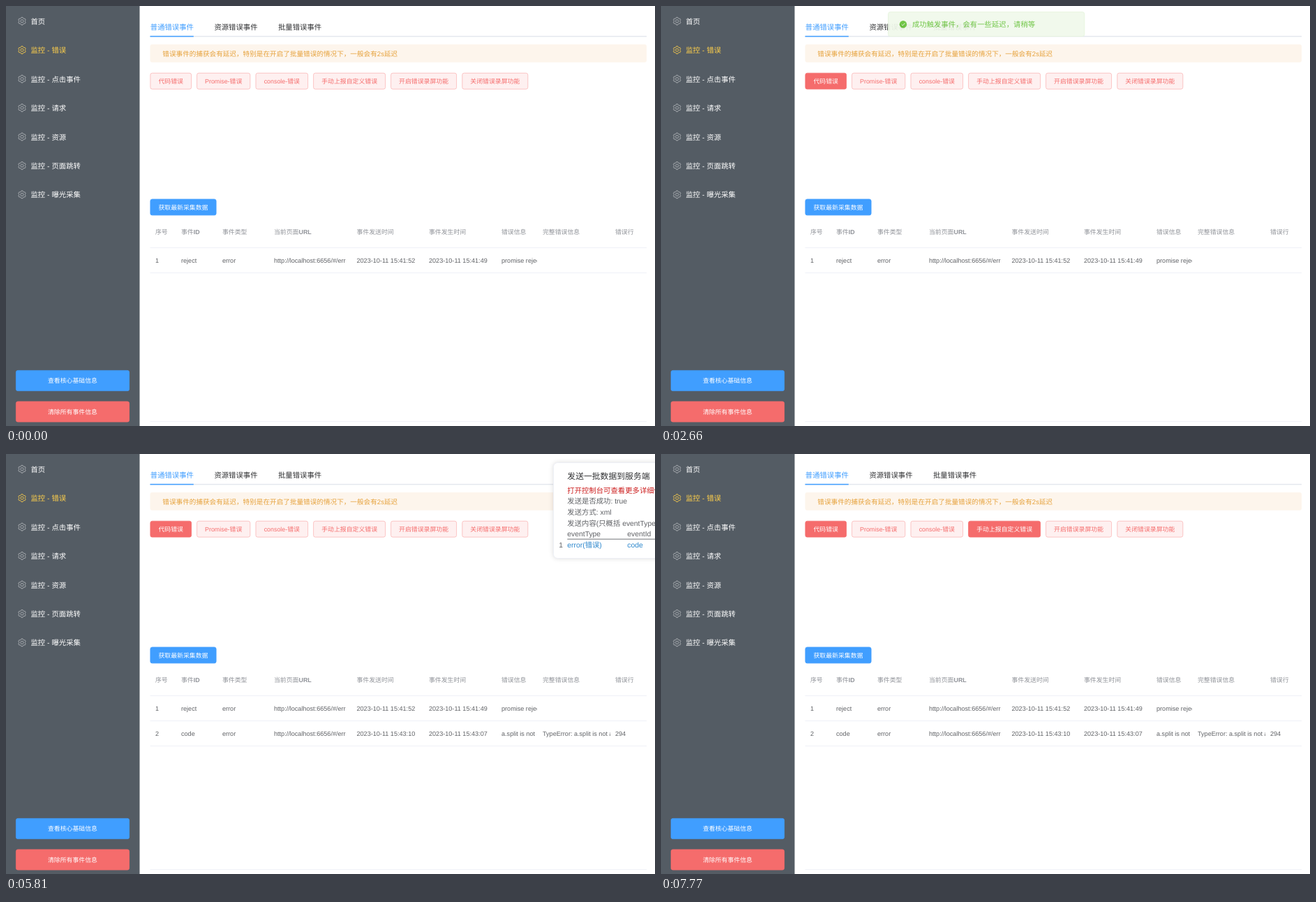
An HTML page that plays this animation: 930x602 px, repeating every 8 s.

```html
<!DOCTYPE html>
<html lang="zh-CN">
<head>
<meta charset="utf-8">
<title>监控 - 错误</title>
<style>
html, body { margin: 0; width: 100%; height: 100%; overflow: hidden; background: #fff; }
svg { display: block; }
text { font-family: "Liberation Sans", "Noto Sans CJK SC", "Noto Sans CJK", sans-serif; text-rendering: geometricPrecision; white-space: pre; }
.medium { font-weight: 500; }

.slide-msg, .fade-msg, .slide-note, .fade-note, .new-row,
.press-code rect, .press-code text, .press-custom rect, .press-custom text {
  animation: 8s ease infinite paused;
}
.slide-msg { animation-name: slide-msg; }
.fade-msg { animation-name: fade-msg; }
.slide-note { animation-name: slide-note; }
.fade-note { animation-name: fade-note; }
.new-row { animation-name: new-row; animation-timing-function: step-end; }
.press-code rect { animation-name: code-box; }
.press-code text { animation-name: code-label; }
.press-custom rect { animation-name: custom-box; }
.press-custom text { animation-name: custom-label; }
.note-card { filter: drop-shadow(0 0 3px rgba(0, 0, 0, .14)); }

@keyframes slide-msg {
  0%, 30.69% { transform: translateY(-35.5px); }
  35.69%, 68.69% { transform: none; }
  73.69%, 100% { transform: translateY(-35.5px); }
}
@keyframes fade-msg {
  0%, 30.69% { opacity: 0; }
  34.44%, 68.69% { opacity: 1; }
  72.44%, 100% { opacity: 0; }
}
@keyframes slide-note {
  0%, 71.375% { transform: translateX(253px); }
  75.125%, 100% { transform: none; }
}
@keyframes fade-note {
  0%, 71.37% { opacity: 0; }
  71.38%, 90.375% { opacity: 1; }
  94.125%, 100% { opacity: 0; }
}
@keyframes new-row { 0% { opacity: 0; } 71.4%, 100% { opacity: 1; } }
@keyframes code-box {
  0%, .625% { fill: #fef0f0; stroke: #fab6b6; }
  2.125%, 100% { fill: #f56c6c; stroke: #f56c6c; }
}
@keyframes code-label { 0%, .625% { fill: #f56c6c; } 2.125%, 100% { fill: #fff; } }
@keyframes custom-box {
  0%, 95.75% { fill: #fef0f0; stroke: #fab6b6; }
  97%, 100% { fill: #f56c6c; stroke: #f56c6c; }
}
@keyframes custom-label { 0%, 95.75% { fill: #f56c6c; } 97%, 100% { fill: #fff; } }
</style>
</head>
<body>
<svg id="stage" width="930" height="602" viewBox="0 0 930 602"></svg>
<script>
const BODY = 10.36, SMALL = 8.9, CELL = 9.1;
const BLUE = '#409eff', RED = '#f56c6c', GREY = '#606266', DARK = '#303133', RULE = '#ebeef5';

// Text is placed by its left edge (or middle) and its vertical centre.
const text = (x, cy, str, fill, size = BODY, attrs = '') =>
  `<text x="${x}" y="${cy + size * 0.37}" font-size="${size}" fill="${fill}" ${attrs}>${str}</text>`;
const rect = (x1, y1, x2, y2, fill, attrs = '') =>
  `<rect x="${x1}" y="${y1}" width="${x2 - x1}" height="${y2 - y1}" fill="${fill}" ${attrs}/>`;
const button = (x1, y1, x2, y2, label, fill, border, color, cls = '') =>
  `<g class="${cls}">` +
  rect(x1 + .4, y1 + .4, x2 - .4, y2 - .4, fill, `rx="2.6" stroke="${border}" stroke-width=".8"`) +
  text((x1 + x2) / 2, (y1 + y2) / 2, label, color, SMALL, 'text-anchor="middle" class="medium"') + '</g>';
const solid = (x1, y1, x2, y2, label, fill) => button(x1, y1, x2, y2, label, fill, fill, '#fff');
const rule = y => rect(206.5, y - .4, 918, y + .4, RULE);

function gear(cx, cy, color) {
  const points = [];
  for (let tooth = 0; tooth < 6; tooth++) {
    for (const [offset, radius] of [[-26, 4.25], [-11, 5.5], [11, 5.5], [26, 4.25]]) {
      const angle = (tooth * 60 - 90 + offset) * Math.PI / 180;
      points.push((cx + radius * Math.cos(angle)).toFixed(2) + ',' + (cy + radius * Math.sin(angle)).toFixed(2));
    }
  }
  return `<g fill="none" stroke="${color}" stroke-width=".83" stroke-linejoin="round">` +
    `<polygon points="${points.join(' ')}"/><circle cx="${cx}" cy="${cy}" r="2.1"/></g>`;
}

function sidebar() {
  const items = ['首页', '监控 - 错误', '监控 - 点击事件', '监控 - 请求', '监控 - 资源', '监控 - 页面跳转', '监控 - 曝光采集'];
  return rect(0, 0, 191.5, 602, '#545c64') +
    items.map((label, i) => {
      const y = 22 + i * 41.43, active = i === 1;
      return gear(23, y - .3, active ? '#ffd04b' : '#b4b8bc') + text(35.5, y, label, active ? '#ffd04b' : '#fff');
    }).join('') +
    solid(14, 522, 177, 552, '查看核心基础信息', BLUE) +
    solid(14, 566.5, 177, 596.5, '清除所有事件信息', RED);
}

function header() {
  const tabs = [[206.8, '普通错误事件'], [298.4, '资源错误事件'], [390, '批量错误事件']];
  const actions = [
    [206.5, 266, '代码错误', 'press-code'], [273.2, 350.2, 'Promise-错误'], [357.6, 433, 'console-错误'],
    [440.2, 544, '手动上报自定义错误', 'press-custom'], [551.2, 646, '开启错误录屏功能'], [653.4, 748.2, '关闭错误录屏功能']
  ];
  return tabs.map(([x, label], i) => text(x, 30, label, i ? DARK : BLUE, BODY, 'class="medium"')).join('') +
    rect(206.5, 42.8, 918, 44.3, '#e4e7ed') + rect(206.5, 42.8, 268.8, 44.3, BLUE) +
    rect(206.5, 55, 918, 80.8, '#fdf5ec', 'rx="3"') +
    text(224.3, 68.3, '错误事件的捕获会有延迟，特别是在开启了批量错误的情况下，一般会有2s延迟', '#e6a23c', 9.62) +
    actions.map(([x1, x2, label, cls]) => button(x1, 95.8, x2, 119.5, label, '#fef0f0', '#fab6b6', RED, cls)).join('');
}

function table() {
  const columns = [
    [214, 30, '序号'], [251, 52, '事件ID'], [310, 67, '事件类型'], [384, 105, '当前页面URL'], [502.5, 97, '事件发送时间'],
    [606, 97, '事件发生时间'], [710, 51, '错误信息'], [769, 97, '完整错误信息'], [873, 45, '错误行']
  ];
  const url = 'http://localhost:6656/#/err';
  const row = (cy, cells) => cells.map((str, i) => {
    const [x, width] = columns[i];
    return `<svg x="${x}" y="${cy - 10}" width="${width}" height="20">${text(0, 10, str, GREY, CELL)}</svg>`;
  }).join('') + rule(cy + 17.6);
  const bold = str => str.replace(/[A-Z]+/, '<tspan font-weight="700">$&</tspan>');
  return solid(206.5, 276.5, 301.5, 300.2, '获取最新采集数据', BLUE) +
    columns.map(([x, , label]) => text(x, 323.5, bold(label), '#909399', SMALL, 'class="medium"')).join('') +
    rule(346.5) + rule(595.7) +
    row(365, ['1', 'reject', 'error', url, '2023-10-11 15:41:52', '2023-10-11 15:41:49', 'promise reject']) +
    '<g class="new-row">' +
    row(401, ['2', 'code', 'error', url, '2023-10-11 15:43:10', '2023-10-11 15:43:07',
      'a.split is not a function', 'TypeError: a.split is not a function', '294']) + '</g>';
}

function message() {
  return '<g class="slide-msg"><g class="fade-msg">' +
    rect(325.6, 15.2, 606.8, 50.2, '#f0f9eb', 'rx="3" stroke="#e1f3d8" stroke-width=".8"') +
    '<circle cx="347" cy="32.8" r="5.2" fill="#67c23a"/>' +
    '<path d="M344.6 32.9l1.7 1.7 3.2-3.3" fill="none" stroke="#fff" stroke-width=".95"/>' +
    text(360, 32.8, '成功触发事件，会有一些延迟，请稍等', '#67c23a') + '</g></g>';
}

function notification() {
  const link = '#2b86cc';
  const lines = [
    [697, 51.7, '打开控制台可查看更多详细信息', '#cc1d1d'], [697, 67.4, '发送是否成功: true'], [697, 83, '发送方式: xml'],
    [697, 98.7, '发送内容(只概括 eventType、eventId)'], [697, 114.3, 'eventType'], [783, 114.3, 'eventId'],
    [685, 130.3, '1'], [697, 130.3, 'error(错误)', link], [783, 130.3, 'code', link]
  ];
  return '<g class="slide-note"><g class="fade-note">' +
    rect(677.2, 12.5, 920.7, 149.5, '#fff', `rx="6" stroke="${RULE}" stroke-width=".8" class="note-card"`) +
    text(697, 31.5, '发送一批数据到服务端', DARK, 11.84, 'class="medium"') +
    '<path d="M899.7 28l7.4 7.4m0-7.4l-7.4 7.4" stroke="#909399" stroke-width=".9"/>' +
    lines.map(([x, y, str, color = GREY]) => text(x, y, str, color)).join('') +
    rect(697, 121.6, 869, 122.5, GREY) + '</g></g>';
}

document.getElementById('stage').innerHTML = sidebar() + header() + table() + message() + notification();

// The screen refreshes in 70 ms steps, so the clock is held between them.
const LOOP = 8000, STEP = 70;
const animations = document.getAnimations();
function tick() {
  const time = Math.floor(performance.now() % LOOP / STEP) * STEP;
  animations.forEach(animation => { animation.currentTime = time; });
  requestAnimationFrame(tick);
}
tick();
</script>
</body>
</html>
```
